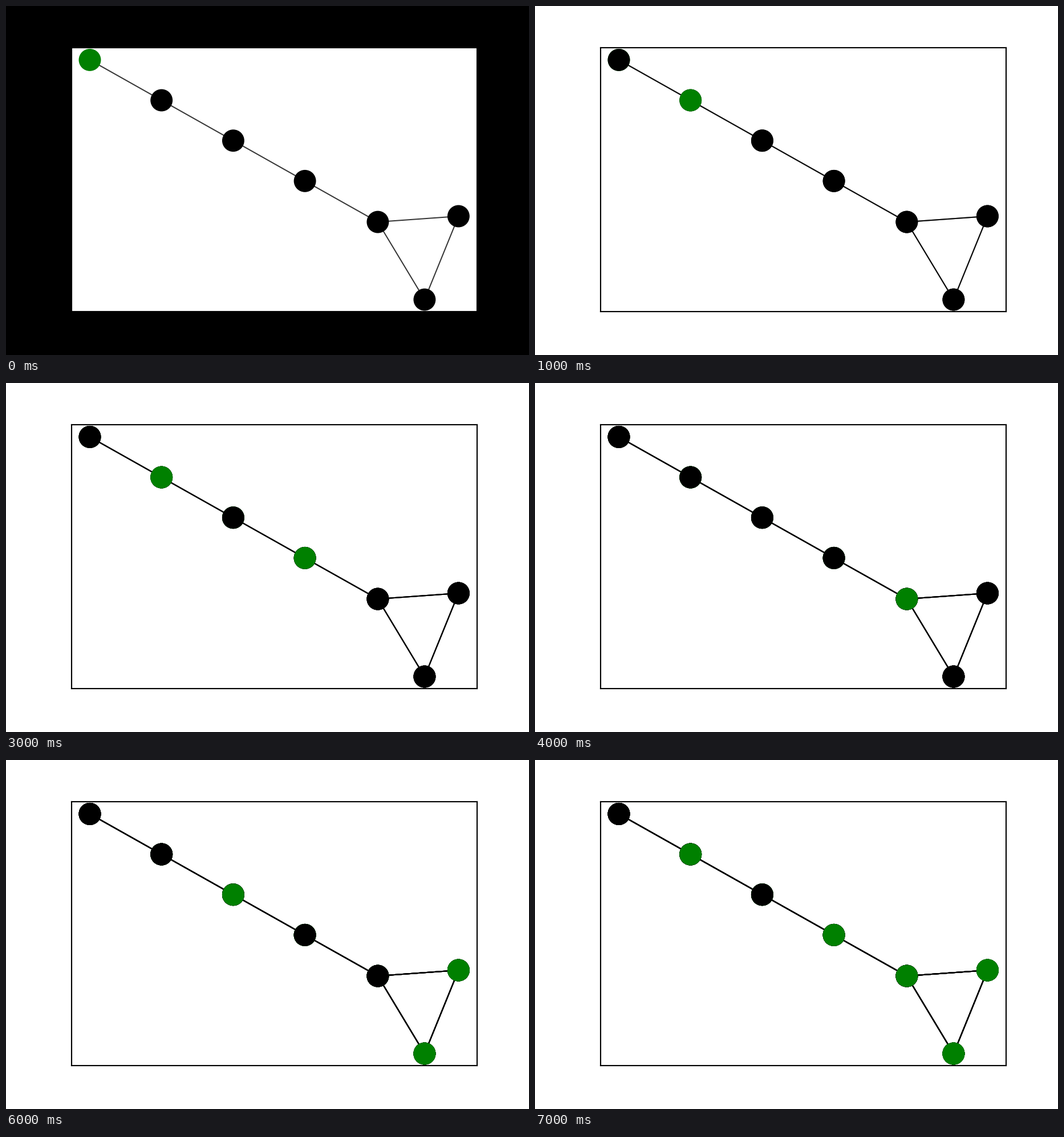
A matplotlib script for the animation above (8 s loop, 917x611 px).

```python
import matplotlib.pyplot as plt
from matplotlib.animation import FuncAnimation
from matplotlib.collections import LineCollection

W, H, DPI = 917, 611, 128
PT = 152.8 / DPI  # scale for point-based sizes
STEPS = 8
LEFT, TOP, RIGHT, BOTTOM = 115, 73, 826, 535

# A straight tail of evenly spaced nodes that ends in a triangle.
tail = [(147 + 125.7 * k, 94.4 + 70.65 * k) for k in range(4)]
nodes = tail + [(651.9, 378.1), (793.4, 368), (733.9, 514)]
count = len(nodes)
edges = [(k, k + 1) for k in range(count - 1)] + [(count - 1, count - 3)]


def neighbours(i):
    return [b if a == i else a for a, b in edges if i in (a, b)]


def step(lit):
    """A node lights up when some, but not all, of its neighbours are lit."""
    result = set()
    for i in range(count):
        near = neighbours(i)
        if 0 < sum(j in lit for j in near) < len(near):
            result.add(i)
    return result


def add_layer(lit):
    lines = LineCollection([(nodes[a], nodes[b]) for a, b in edges],
                           colors="black", linewidths=0.95 * PT, alpha=0.79,
                           zorder=1)
    ax.add_collection(lines, autolim=False)
    colors = ["green" if i in lit else "black" for i in range(count)]
    dots = ax.scatter(*zip(*nodes), s=300 * PT ** 2, c=colors,
                      edgecolors=colors, linewidths=PT, zorder=2)
    return lines, dots


fig = plt.figure(figsize=(W / DPI, H / DPI), dpi=DPI)
ax = fig.add_axes([LEFT / W, 1 - BOTTOM / H,
                   (RIGHT - LEFT) / W, (BOTTOM - TOP) / H])
ax.set(xlim=(LEFT, RIGHT), ylim=(BOTTOM, TOP), xticks=[], yticks=[])
for spine in ax.spines.values():
    spine.set_linewidth(PT)

# Each step paints over the earlier ones, so the lines grow darker.
layers = []
lit = {0}
for _ in range(STEPS):
    layers.append(add_layer(lit))
    lit = step(lit)


def draw(n):
    fig.set_facecolor("black" if n == 0 else "white")
    for k, layer in enumerate(layers):
        for artist in layer:
            artist.set_visible(k <= n)
    return []


anim = FuncAnimation(fig, draw, frames=STEPS, interval=1000, repeat=True,
                     repeat_delay=0, blit=False)
plt.show()
```
